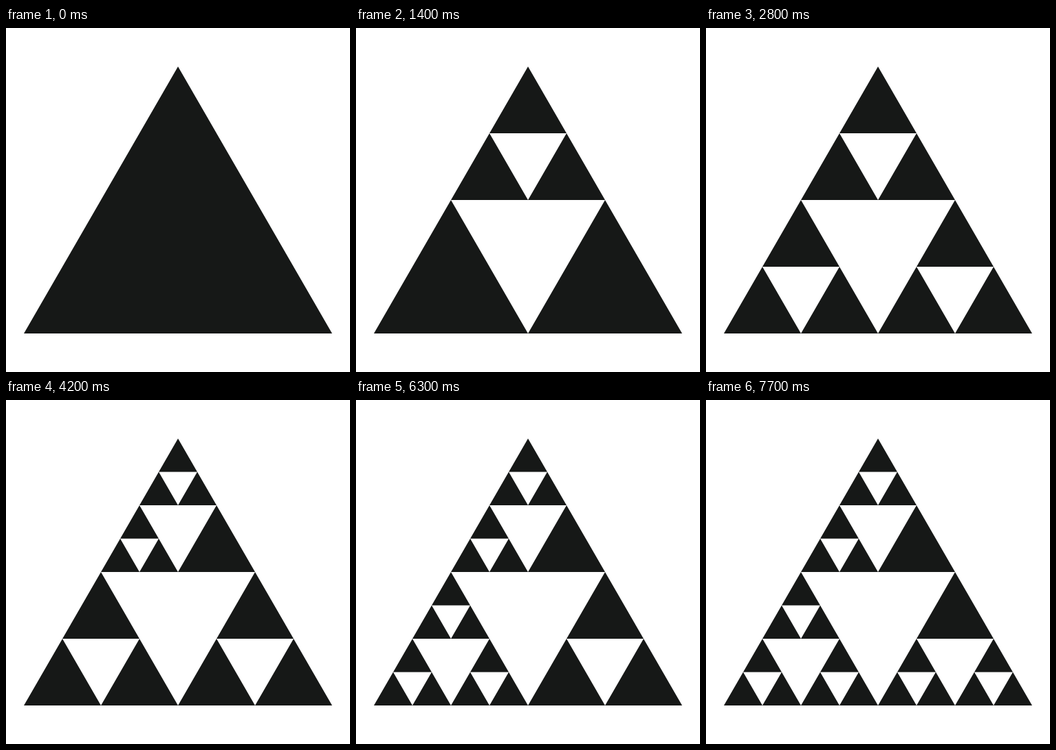
Write an HTML page with a canvas that moves like this. It is 500 by 500 pixels and loops after 8000 ms.

```html
<!DOCTYPE html>
<html lang="en">
<head>
<meta charset="utf-8">
<title>Triangle subdivision</title>
<style>
html, body { margin: 0; width: 100%; height: 100%; overflow: hidden; background: #fff; }
canvas { display: block; width: 500px; height: 500px; }
</style>
</head>
<body>
<canvas id="stage" width="500" height="500"></canvas>
<script>
const ctx = document.getElementById('stage').getContext('2d');
const INK = '#161817', PAPER = '#fff';
const LOOP = 8000, STEP = 700;
const ROOT = { x: 250, y: 56, w: 448, h: 388 };

// Each hole is addressed by its path of sub-triangles: Top, Left, Right.
const HOLES = ['', 'T', 'L', 'R', 'TT', 'TL', 'LT', 'LL', 'LR', 'RL', 'RR'];

function child({ x, y, w, h }, side) {
  const dx = { T: 0, L: -w / 4, R: w / 4 }[side];
  return { x: x + dx, y: side === 'T' ? y : y + h / 2, w: w / 2, h: h / 2 };
}

function fillTriangle(color, cx, tipY, baseY, width) {
  ctx.fillStyle = color;
  ctx.beginPath();
  ctx.moveTo(cx, tipY);
  ctx.lineTo(cx + width / 2, baseY);
  ctx.lineTo(cx - width / 2, baseY);
  ctx.fill();
}

function draw(time) {
  const count = Math.floor((time % LOOP) / STEP);
  ctx.fillStyle = PAPER;
  ctx.fillRect(0, 0, 500, 500);
  fillTriangle(INK, ROOT.x, ROOT.y, ROOT.y + ROOT.h, ROOT.w);
  for (const path of HOLES.slice(0, count)) {
    const { x, y, w, h } = [...path].reduce(child, ROOT);
    fillTriangle(PAPER, x, y + h, y + h / 2, w / 2);
  }
}

const start = performance.now();
function tick() {
  draw(performance.now() - start);
  requestAnimationFrame(tick);
}
tick();
</script>
</body>
</html>
```
